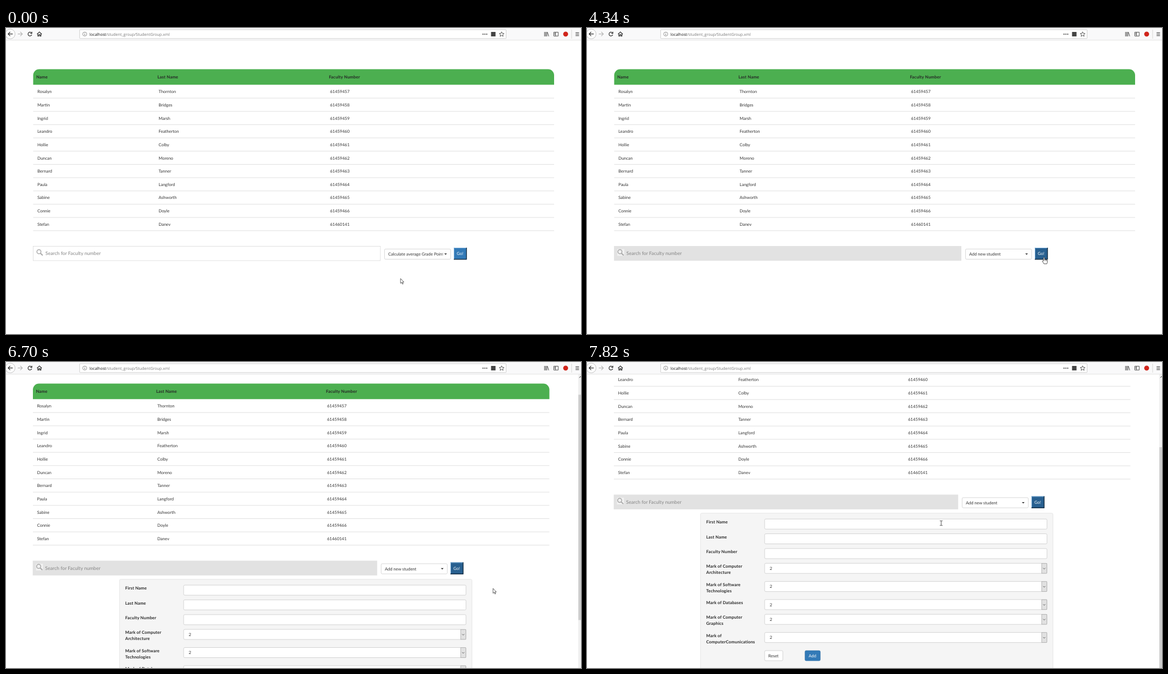
An HTML page that plays this animation: 1026x546 px, repeating every 8000 ms.

```html
<!DOCTYPE html>
<html lang="en">
<head>
<meta charset="utf-8">
<title>Student group</title>
<style>
  html, body { margin: 0; width: 100%; height: 100%; overflow: hidden; background: #fff; }
  svg { display: block; }
  text { font: 7.5px Lato, sans-serif; fill: #333; text-rendering: geometricPrecision; }
  .b { font-weight: 700; letter-spacing: .18px; fill: #262626; }
  .hint { font-size: 8.65px; fill: #858585; }
  .w { fill: #fff; }
  .url { font: 7.05px "Open Sans", sans-serif; fill: #111; }
  .url tspan { fill: #777; }
  .ico { fill: none; stroke: #333; stroke-width: 1.2; }
  .menu { filter: drop-shadow(0 3px 3px rgba(0, 0, 0, .18)); }
</style>
</head>
<body>
<svg width="1026" height="546" viewBox="0 0 1026 546">
  <g id="page"></g>
  <g id="bar"></g>
  <g id="chrome">
    <rect width="1026" height="22" fill="#f9f9fa"/>
    <path d="M0 21.7H1026" stroke="#dcdcdc" stroke-width=".8"/>
    <circle cx="7.5" cy="10.7" r="8.7" fill="#fff" stroke="#b5b5b5" stroke-width=".8"/>
    <g class="ico">
      <path d="M12 10.7H4M7.5 7L3.8 10.7L7.5 14.4"/>
      <path d="M21 10.7H29M25.5 7L29.2 10.7L25.5 14.4" stroke="#b8b8b8"/>
      <path d="M45.4 8.7A3.4 3.4 0 1 0 45.9 12M46.2 6.8V9.6H43.4"/>
      <path d="M55.4 11L59.6 7L63.8 11M56.8 10.5V14.4H58.6V11.8H60.6V14.4H62.4V10.5"/>
    </g>
    <rect x="131.4" y="3" width="761" height="15.8" rx="1" fill="#fff" stroke="#c6c6c6" stroke-width=".8"/>
    <circle cx="140.5" cy="10.8" r="3.6" fill="none" stroke="#666" stroke-width=".7"/>
    <path d="M140.5 10.3V13M140.5 8.6V9.4" stroke="#666" stroke-width=".8"/>
    <text class="url" x="149" y="13.6">localhost<tspan>/student_group/StudentGroup.xml</tspan></text>
    <g fill="#444">
      <circle cx="851.2" cy="11" r="1.1"/><circle cx="854.5" cy="11" r="1.1"/><circle cx="857.8" cy="11" r="1.1"/>
      <rect x="865.5" y="7" width="8" height="8"/>
    </g>
    <path d="M884.4 6.8L885.7 9.6L888.7 9.9L886.4 11.9L887.1 14.9L884.4 13.3L881.7 14.9L882.4 11.9L880.1 9.9L883.1 9.6Z" fill="none" stroke="#444" stroke-width=".9"/>
    <path d="M961 7V15M963 7V15M965 7V15M966 7.2L968.4 14.8" stroke="#444"/>
    <path d="M977.5 7.5H985.3V14.3H977.5ZM980.6 7.5V14.3M978.5 9.5H980M978.5 11.3H980" fill="none" stroke="#444" stroke-width=".9"/>
    <circle cx="998.6" cy="10.8" r="4.4" fill="#d0241b"/>
    <path d="M1009.3 3V19" stroke="#d0d0d0" stroke-width=".8"/>
    <path d="M1016.3 8.3H1022.5M1016.3 11H1022.5M1016.3 13.7H1022.5" stroke="#333"/>
  </g>
  <g id="cursor"></g>
</svg>
<script>
const $ = id => document.getElementById(id);

const people = `Rosalyn Thornton,Martin Bridges,Ingrid Marsh,Leandro Featherton,Hollie Colby,Duncan Moreno,
Bernard Tanner,Paula Langford,Sabine Ashworth,Connie Doyle,Stefan Danev`.split(',').map(p => p.trim().split(' '));
const actions = ['Calculate average Grade Point', 'Students with grade lower than average',
  'Add new student', 'Edit student', 'Erase student'];
// label and vertical centre of each form field
const fields = [['First Name', 441.7], ['Last Name', 468], ['Faculty Number', 494.4],
  ['Mark of Computer|Architecture', 520.7], ['Mark of Software|Technologies', 553.1],
  ['Mark of Databases', 585.4], ['Mark of Computer|Graphics', 611.7], ['Mark of|ComputerComunications', 644.1]];

// pointer path: time, x, y
const path = [[0, 704, 447], [40, 704, 447], [140, 711, 447], [360, 711, 447], [450, 712, 446], [600, 712, 446],
  [1310, 713, 411], [1840, 713, 411], [2340, 712, 452], [2780, 712, 452], [2800, 712, 451], [3200, 712, 451],
  [4040, 816, 411], [4110, 815.5, 409], [4480, 815.5, 409], [4660, 812, 424], [4870, 812, 424], [5010, 869, 445],
  [5130, 873, 434], [5300, 873, 434], [5330, 869, 420], [5440, 869, 420], [5470, 873, 410], [5920, 873, 410],
  [6260, 869, 404], [7440, 869, 404], [7820, 632, 287.5], [8000, 632, 287.5]];
// wheel scrolling: time, offset
const wheel = [[0, 0], [6470, 14], [6530, 28], [6700, 34.5], [6750, 58], [6820, 82], [6890, 104],
  [6960, 123.7], [7070, 146], [7210, 152.4]];

const text = (x, y, s, cls = '') => `<text x="${x}" y="${y}" class="${cls}">${s}</text>`;
const rect = (x, y, w, h, fill, stroke = 'none', rx = 0) =>
  `<rect x="${x}" y="${y}" width="${w}" height="${h}" rx="${rx}" fill="${fill}" stroke="${stroke}" stroke-width=".7"/>`;
const inside = (p, x, y, w, h) => p.x >= x && p.x <= x + w && p.y >= y && p.y <= y + h;

function pointer(t) {
  const i = path.findIndex(k => k[0] > t);
  const [t0, x0, y0] = path[i - 1], [t1, x1, y1] = path[i];
  const u = (t - t0) / (t1 - t0);
  return { x: x0 + (x1 - x0) * u, y: y0 + (y1 - y0) * u };
}

function table(narrow) {
  const right = narrow ? 969.6 : 978, left = narrow ? 48 : 48.5;
  const cols = narrow ? [53.5, 268, 571] : [54, 270.3, 576.2];
  let s = `<path d="M${left} 101.2V84.2a10.7 10.7 0 0 1 10.7 -10.7H${right - 10.7}a10.7 10.7 0 0 1 10.7 10.7V101.2Z" fill="#4caf50"/>`;
  ['Name', 'Last Name', 'Faculty Number'].forEach((h, i) => s += text(cols[i], 90.3, h, 'b'));
  people.forEach((p, r) => {
    const y = 116.2 + r * 23.66;
    [...p, r < 10 ? 61459457 + r : 61460141].forEach((v, i) => s += text(cols[i] + 2, y, v));
    s += `<path d="M${left} ${y + 8.9}H${right}" stroke="#d8d8d8" stroke-width=".8"/>`;
  });
  return `<g transform="translate(0 ${narrow ? -.4 : 0})">${s}</g>`;
}

function search(narrow, off) {
  const x = narrow ? 48 : 48.5, w = narrow ? 614.3 : 619.5;
  return (off ? rect(x - .3, 389, w + .3, 26.3, '#e2e2e2') + rect(x + 5.5, 394.5, 12.5, 12, '#f1f1f1')
              : rect(x, 389.4, w, 25.6, '#fff', '#d5d5d5'))
    + `<g fill="none" stroke="#a9a9a9"><circle cx="${x + 10.3}" cy="399.2" r="3.6" stroke-width="1.5"/>
       <path d="M${x + 13} ${402}l4 3.8" stroke-width="1.9"/></g>`
    + text(x + 21.8, 405, 'Search for Faculty number', 'hint');
}

function controls({ narrow, fill, edge, label, go, open, ring, hot }) {
  let s = rect(675.4, 394.4, 118, 18.2, fill, edge, 2)
    + `<svg x="682" y="395" width="97.5" height="17">${text(0, 11.1, label)}</svg>`
    + '<path d="M782 402.3h4.8l-2.4 2.5z" fill="#333"/>'
    + rect(799, 392, 23.2, 21.2, go ? '#286090' : '#337ab7')
    + '<path d="M799.5 413V392.5H822" fill="none" stroke="#7fb0da"/>'
    + '<path d="M799 412.6H821.6V392" fill="none" stroke="#0e2336" stroke-width="1.2"/>'
    + text(804.3, 405, 'Go!', 'w');
  if (open) {
    s += `<g class="menu">${rect(675.5, 414.4, 151.5, 75.4, '#fff', '#c9c9c9', 2)}</g>`;
    actions.forEach((a, i) => {
      const y = 417.4 + i * 14;
      if (i === hot || (!i && ring)) s += rect(676, y, 150.5, 13.6, '#f5f5f5', !i && ring ? '#666' : 'none');
      s += text(686.4, y + 9, a);
    });
  }
  return `<g transform="translate(${narrow ? -6 : 0} 0)">${s}</g>`;
}

function form(alpha) {
  let s = rect(202.6, 422.2, 628.8, 300, '#f5f5f5', '#dedede', 2);
  fields.forEach(([label, y], i) => {
    label.split('|').forEach((l, n) => s += text(212.8, y - .8 + n * 10.7, l, 'b'));
    s += rect(317, y - 9.1, 503.8, 18, '#fff', '#c4c4c4', 2);
    if (i > 2) s += text(326, y + 2.7, 2) + rect(811.2, y - 8.9, 9.3, 17.6, '#e1e1e1', '#a5a5a5')
      + `<path d="M813.8 ${y - .8}l2 2l2 -2" fill="none" stroke="#444" stroke-width=".8"/>`;
  });
  s += rect(317, 667.4, 32.4, 18, '#fff', '#c4c4c4', 2) + text(323.5, 679, 'Reset')
    + rect(389, 667.4, 27.2, 18, '#337ab7', '#2e6da4', 2) + text(395.6, 679, 'Add', 'w');
  return `<g opacity="${alpha}">${s}</g>`;
}

const shapes = {
  arrow: '<path d="M0 0V8.6L2 6.8L3.4 10L4.8 9.4L3.4 6.3H6Z" fill="#fff" stroke="#222" stroke-width=".7"/>',
  hand: `<path d="M-1 6.8V.8Q0 -.4 1 .8V4.2Q2.2 3.5 2.8 4.6Q4 4 4.5 5.1Q5.8 4.7 5.9 6V8.6Q5.8 10 5 11.8H-.2
    Q-1 10 -2.6 8Q-3.4 6.4 -2.2 6.2Z" fill="#fff" stroke="#222" stroke-width=".75"/>
    <path d="M1 4.2V6.6M2.8 4.8V6.8M4.5 5.3V7" stroke="#222" stroke-width=".5"/>`,
  beam: '<path d="M-2.4 -4.2H-.5L0 -3.7L.5 -4.2H2.4M-2.4 4.2H-.5L0 3.7L.5 4.2H2.4M0 -3.7V3.7" fill="none" stroke="#222" stroke-width=".8"/>'
};

function set(id, html) {
  const el = $(id);
  if (el.last !== html) el.innerHTML = el.last = html;
}

function draw(now) {
  const t = now % 8000, p = pointer(t);
  const scroll = wheel.filter(k => k[0] <= t).pop()[1];
  const narrow = t >= 5470, open = t >= 1540 && t < 2950, picked = t >= 2950;
  const onBox = !narrow && inside(p, 675, 394, 118.5, 18.8);
  const onGo = !narrow && inside(p, 799, 392, 23, 21);
  const onMenu = open && inside(p, 675, 417, 152, 70);
  const inField = narrow && fields.slice(0, 3).some(f => inside(p, 317, f[1] - 9 - scroll, 504, 18));

  const focus = picked && t < 4340;
  const [fill, edge] = open && onBox ? ['#d4d4d4', '#8c8c8c']
    : focus ? ['#e6e6e6', '#8c8c8c']
    : open || onBox ? ['#e6e6e6', '#adadad'] : ['#fff', '#c8c8c8'];

  set('page', table(narrow) + search(narrow, picked) + controls({
    narrow, fill, edge, open, label: actions[picked ? 2 : 0], go: onGo || t >= 4340,
    ring: t < 2640, hot: onMenu ? Math.floor((p.y - 417) / 14) : -1
  }) + (narrow ? form(Math.min(1, .1 + (t - 5470) / 380)) : ''));
  $('page').setAttribute('transform', `translate(0 ${-scroll})`);

  set('bar', narrow ? rect(1021, 22, 6, 524, '#f0f0f0') + rect(1021.3, 31 + scroll * .794, 6, 402, '#cdcdcd')
    + '<path d="M1022.8 28.2L1025.2 25.8L1027.6 28.2" fill="none" stroke="#444"/>' : '');

  set('cursor', shapes[inField ? 'beam' : onBox || onGo || onMenu ? 'hand' : 'arrow']);
  $('cursor').setAttribute('transform', `translate(${p.x} ${p.y})`);
}

const start = performance.now();
function frame() {
  draw(performance.now() - start);
  requestAnimationFrame(frame);
}
frame();
</script>
</body>
</html>
```
